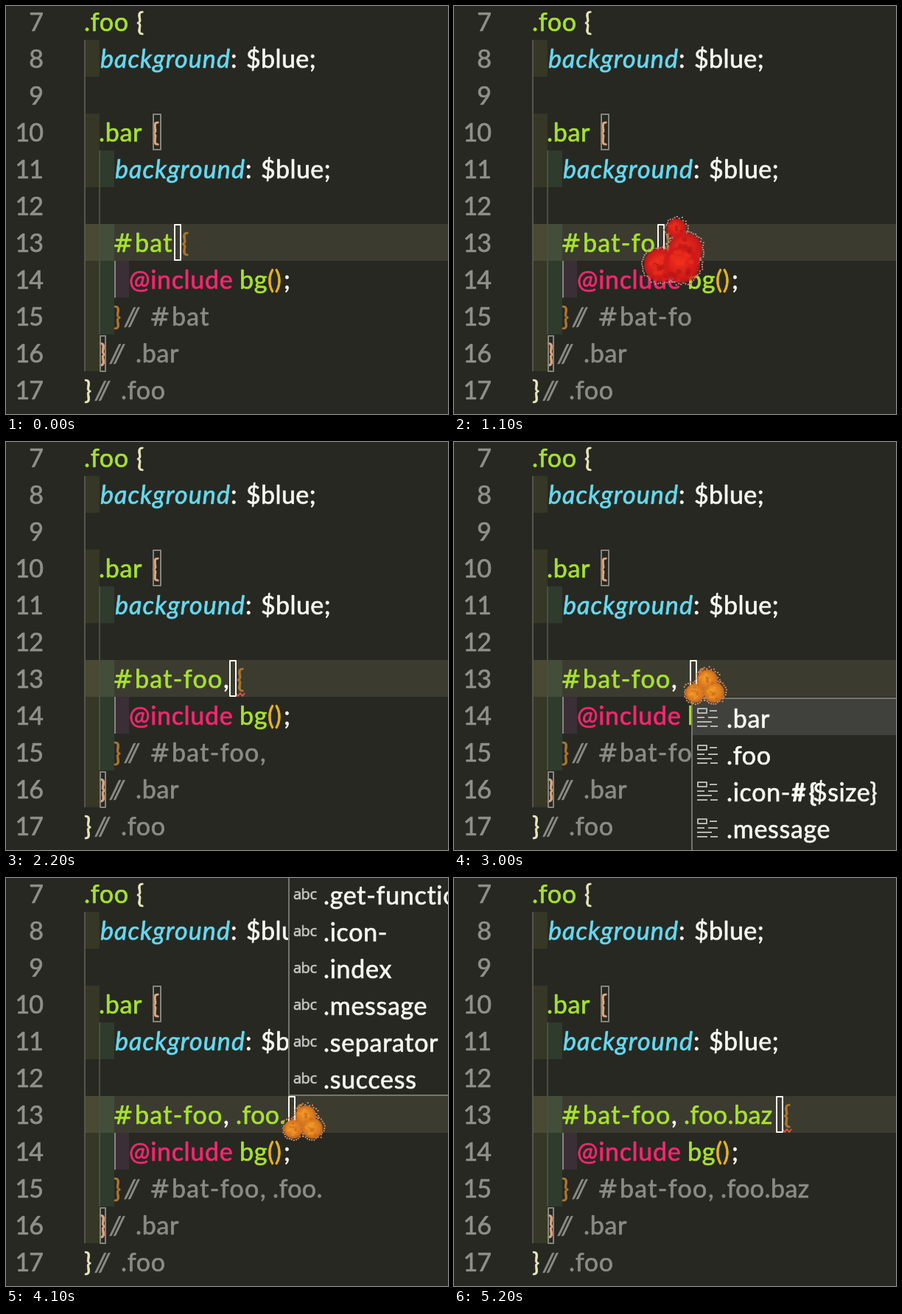
Animation, 600 px wide and 554 px high, one loop 5.3 s. Source, as an HTML page with a canvas:

```html
<!DOCTYPE html>
<html lang="en">
<head>
<meta charset="utf-8">
<style>
  html, body { margin: 0; width: 600px; height: 554px; overflow: hidden; background: #272822; }
  canvas { display: block; }
</style>
</head>
<body>
<canvas id="stage" width="600" height="554"></canvas>
<script>
const ctx = document.getElementById('stage').getContext('2d');
const LOOP = 5300, STEP = 100;
const GREEN = '#a6e22e', CYAN = '#66d9ef', WHITE = '#f8f8f2', GREY = '#8b8b86',
      PINK = '#f92672', GOLD = '#e6b422', CREAM = '#e6e6bc', SALMON = '#e5a67c', BROWN = '#b0742c';

// [time, typed selector, cursor x, popup]
const KEYS = [
  [0, '#bat', 228], [100, '#bat-', 242], [200, '#bat-f', 259], [900, '#bat-fo', 276],
  [1400, '#bat-foo', 293], [1600, '#bat-foo,', 303], [2900, '#bat-foo, ', 320, 'all'],
  [3200, '#bat-foo, .', 328, 'all'], [3300, '#bat-foo, .f', 341, 'one'],
  [3500, '#bat-foo, .fo', 358, 'one'], [3700, '#bat-foo, .foo', 375, 'one'],
  [4000, '#bat-foo, .foo.', 383, 'words'], [4400, '#bat-foo, .foo.b', 401],
  [4500, '#bat-foo, .foo.ba', 419], [4600, '#bat-foo, .foo.baz', 437]
];
// Solid phase of a burst: lobes are [dx, dy, radius]
const FIREBALLS = [
  { core: '#f2a028', rim: '#d9761f', fuzz: '#d98a5a', spot: '#c8641c', lobes: [[3, -11, 14], [-14, 7, 13], [12, 6, 14]] },
  { core: '#f0301c', rim: '#d01a18', fuzz: '#d8807a', spot: '#b01616', lobes: [[5, -32, 13], [17, -3, 23], [-16, 18, 23], [12, 17, 25]] }
];
const baseline = line => 34 + 50 * (line - 7);
const rowTop = line => 50 * (line - 7) - 4;
const random = n => { const v = Math.sin(n * 127.1 + 11.7) * 43758.5453; return v - Math.floor(v); };

function rect(x, y, w, h, color) {
  ctx.fillStyle = color;
  ctx.fillRect(x, y, w, h);
}

function outline(x, y, w, h, color, width = 2) {
  ctx.strokeStyle = color;
  ctx.lineWidth = width;
  ctx.strokeRect(x, y, w, h);
}

function disc(x, y, r, fill) {
  ctx.fillStyle = fill;
  ctx.beginPath();
  ctx.arc(x, y, r, 0, 2 * Math.PI);
  ctx.fill();
}

function text(str, x, y, color, { style = '', gap = 0.7, size = 34, face = 'Lato' } = {}) {
  ctx.font = `${style} ${size}px ${face}, sans-serif`;
  ctx.letterSpacing = gap + 'px';
  ctx.fillStyle = ctx.strokeStyle = color;
  ctx.lineWidth = 0.7;
  ctx.lineJoin = 'round';
  ctx.fillText(str, x, y);
  ctx.strokeText(str, x, y);
}

function selector(str, x, y, color, commaColor) {
  const [id, rest] = str.split(',');
  text('#', x - 2, y, color, { face: '"DejaVu Sans"', size: 33 });
  text(id.slice(1), x + 28, y, color, { gap: 1.3 });
  if (rest === undefined) return;
  text(',', x + 148, y, commaColor);
  text(rest.trim(), x + 165, y, color, { gap: 0.4 });
}

function closing(line, x, color) {
  text('}', x, baseline(line), color);
  text('//', x + 15, baseline(line), GREY, { style: 'italic', gap: -2 });
}

function declaration(line, x) {
  text('background', x, baseline(line), CYAN, { style: 'italic', gap: 1.1 });
  text(':', x + 177, baseline(line), WHITE);
  text('$blue;', x + 198, baseline(line), WHITE, { gap: 0.4 });
}

function background() {
  rect(0, 0, 600, 554, '#272822');
  rect(107, rowTop(13), 493, 50, '#3c3b30');
  const tints = ['rgba(255,255,64,.07)', 'rgba(127,255,150,.09)', 'rgba(255,127,255,.09)'];
  const depths = { 8: 1, 10: 1, 11: 2, 13: 2, 14: 3, 15: 2, 16: 1 };
  for (const line in depths)
    for (let d = 0; d < depths[line]; d++) rect(107 + 20 * d, rowTop(line), 20, 50, tints[d]);
  rect(106, rowTop(8), 2, 450, '#55564c');
  rect(126, rowTop(11), 2, 250, '#4b4d44');
  rect(147, rowTop(14), 2, 50, '#85857c');
}

function code(typed, note, cursor) {
  ctx.textAlign = 'right';
  for (let n = 7; n <= 17; n++) text(n, 50, baseline(n), '#90908a', { gap: -1 });
  ctx.textAlign = 'left';
  text('.foo', 106, baseline(7), GREEN);
  text('{', 177, baseline(7), CREAM);
  declaration(8, 128);
  text('.bar', 126, baseline(10), GREEN);
  text('{', 198, baseline(10), SALMON);
  outline(200, 147, 10, 48, '#85857e');
  declaration(11, 148);
  selector(typed, 147, baseline(13), GREEN, WHITE);
  text('{', cursor + 10, baseline(13), BROWN);
  text('@include', 167, baseline(14), PINK);
  text('bg', 317, baseline(14), GREEN);
  text('()', 355, baseline(14), GOLD);
  text(';', 377, baseline(14), WHITE);
  closing(15, 146, BROWN);
  selector(note, 197, baseline(15), GREY, GREY);
  closing(16, 126, SALMON);
  outline(128, 448, 7, 48, '#85857e');
  text('.bar', 176, baseline(16), GREY);
  closing(17, 106, CREAM);
  text('.foo', 156, baseline(17), GREY);
  if (typed.includes(',')) {
    ctx.strokeStyle = '#e0523c';
    ctx.lineWidth = 2;
    ctx.beginPath();
    for (let i = 0; i < 5; i++) ctx.lineTo(cursor + 9 + 3 * i, i % 2 ? 345 : 341);
    ctx.stroke();
  }
}

function snippetIcon(x, y) {
  outline(x + 1, y + 1, 12, 6, '#b4b4b0');
  for (const [dx, dy, w] of [[17, 3, 10], [0, 12, 10], [15, 12, 13], [0, 18, 20], [0, 24, 14], [18, 24, 10]])
    rect(x + dx, y + dy, w, 2, '#b4b4b0');
}

function popup(kind, x) {
  const border = '#75756a';
  if (kind === 'words') {
    rect(x, 0, 600 - x, 296, '#272822');
    rect(x, 0, 2, 296, border);
    rect(x, 294, 600 - x, 2, border);
    ['.get-function', '.icon-', '.index', '.message', '.separator', '.success'].forEach((word, i) => {
      text('abc', x + 7, 29 + 50 * i, '#c5c5c0', { size: 20, face: '"Open Sans"', gap: -0.5 });
      text(word, x + 48, 36 + 50 * i, WHITE);
    });
    return;
  }
  const single = kind === 'one', height = single ? 50 : 207;
  rect(x, 347, 600 - x, height, '#272822');
  rect(x, 348, 600 - x, 50, '#40403c');
  rect(x, 347, 600 - x, 2, border);
  rect(x, 347, 2, height, border);
  if (single) {
    rect(x, 395, 600 - x, 2, border);
    snippetIcon(x + 8, 361);
    text('.foo', x + 47, 388, WHITE, { style: 'bold' });
    return;
  }
  ['.bar', '.foo', '.icon-', '.message'].forEach((word, i) => {
    snippetIcon(x + 8, 361 + 50 * i);
    text(word, x + 48, 388 + 50 * i, WHITE);
  });
  text('#{', x + 136, 488, WHITE, { style: 'bold', gap: 4 });
  text('$size}', x + 165, 488, WHITE, { gap: 0.5 });
}

function fireball(x, y, step) {
  const { core, rim, fuzz, spot, lobes } = FIREBALLS[step - 1];
  lobes.forEach(([dx, dy, r], i) => {
    const count = Math.round(r * 2.2);
    for (let a = 0; a < count; a++) {
      const angle = a / count * 2 * Math.PI, d = r + 4 * random(a + 31 * i);
      rect(x + dx + d * Math.cos(angle) - 1, y + dy + d * Math.sin(angle) - 1, 2, 2, fuzz);
    }
  });
  for (const [dx, dy, r] of lobes) {
    const cx = x + dx, cy = y + dy;
    const glow = ctx.createRadialGradient(cx - r / 4, cy - r / 4, 0, cx, cy, r);
    glow.addColorStop(0, core);
    glow.addColorStop(0.8, rim);
    glow.addColorStop(1, rim + 'b0');
    disc(cx, cy, r, glow);
  }
  lobes.forEach(([dx, dy, r], i) => {
    for (let s = 0; s < 10; s++) {
      const angle = 2 * Math.PI * random(s + 17 * i), d = r * 0.8 * random(s * 5 + i);
      disc(x + dx + d * Math.cos(angle), y + dy + d * Math.sin(angle), r / 7, (s % 2 ? spot : core) + '90');
    }
  });
}

// Dotted clouds that drift apart and thin out
function sparks(x, y, step) {
  const k = (step - 2) / 3;
  const clouds = [[13, -18, 28, .95], [-33, -35, 13, .75], [-76, 31, 17, .25], [-10, 50, 13, .15], [9, 106, 8, .4]];
  clouds.forEach(([dx, dy, size, density], c) => {
    const r = 22 + (size - 22) * k, cx = x + dx * k, cy = y + dy * k;
    const color = c === 2 ? '#c558c8' : '#e6a0dc';
    for (let v = -r; v < r; v += 4)
      for (let u = -r; u < r; u += 4) {
        const hole = c === 0 && Math.hypot(u + r * .5, v - r * .65) < r * .9 * k;
        if (hole || Math.hypot(u, v) > r) continue;
        if (random(u * 3.1 + v * 17.3 + c * 7) < density) rect(Math.round(cx + u), Math.round(cy + v), 3, 3, color);
      }
  });
  for (const [dx, dy] of [[64, 2], [42, 34], [66, -33], [5, -8], [-44, 57], [-8, -81], [-58, -5], [32, 50]]) {
    const px = Math.round(x + dx * k), py = Math.round(y + dy * k);
    rect(px - 3, py, 8, 2, '#d070d8');
    rect(px, py - 3, 2, 8, '#d070d8');
  }
}

function draw(t) {
  const index = KEYS.findLastIndex(key => key[0] <= t);
  let [start, typed, cursor, list] = KEYS[index];
  const note = typed;
  let step = (t - start) / STEP;
  // The comma reaches the comment before the line itself repaints
  if (note.endsWith(',') && step === 0) {
    [, typed, cursor] = KEYS[index - 1];
    step = 2;
  }
  background();
  code(typed, note, cursor);
  outline(cursor + 1, 297, 8, 48, WHITE);
  if (list) popup(list, cursor + (list === 'all' ? 2 : 0));
  if (index === 0 || step < 1 || step > 5) return;
  (step < 3 ? fireball : sparks)(cursor + 21, 334, step);
}

function tick(now) {
  draw(Math.floor(now % LOOP / STEP) * STEP);
  requestAnimationFrame(tick);
}
requestAnimationFrame(tick);
</script>
</body>
</html>
```
